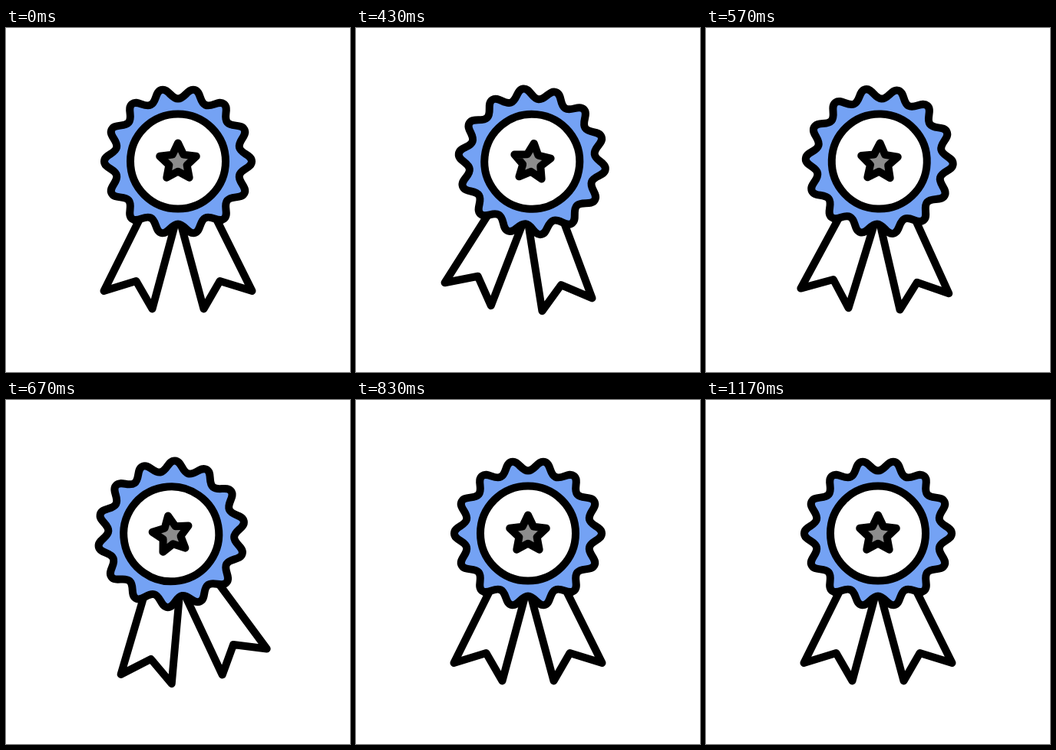
These frames come from a looping animation (448 px wide and 450 px high, 1.21 s). An HTML page:

```html
<!DOCTYPE html>
<html lang="en">
<head>
<meta charset="utf-8">
<title>Award rosette</title>
<style>
  html, body { margin: 0; width: 100%; height: 100%; overflow: hidden; background: #fff; }
  svg { display: block; width: 100%; height: 100%; }
</style>
</head>
<body>
<svg viewBox="0 0 448 450">
  <g id="badge" fill="#fff" stroke="#000" stroke-width="10" stroke-linejoin="round" stroke-linecap="round">
    <path id="ribbon" d="M179 240L127.5 344L169.5 331L190.5 367.5L222 250"/>
    <use href="#ribbon" transform="matrix(-1 0 0 1 448 0)"/>
    <path id="rosette" fill="#74a2f4"/>
    <circle cx="224" cy="174.5" r="62"/>
    <path id="star" fill="#8c8c8c"/>
  </g>
</svg>
<script>
const LOOP = 1210;
const CENTER = { x: 224, y: 174.5 };
const badge = document.getElementById('badge');
const rosette = document.getElementById('rosette');
const star = document.getElementById('star');

// Point at radius r and angle a (clockwise from the top), shifted along the tangent.
function polar(r, a, shift = 0, cy = CENTER.y) {
  const x = CENTER.x + r * Math.sin(a) + shift * Math.cos(a);
  const y = cy - r * Math.cos(a) + shift * Math.sin(a);
  return `${x.toFixed(2)} ${y.toFixed(2)}`;
}

function rosettePath(points, tip, valley) {
  const half = Math.PI / points;
  let d = `M${polar(valley, 0)}`;
  for (let i = 0; i < points; i++) {
    const a = 2 * half * i, b = a + half, c = b + half;
    d += `C${polar(valley, a, 9)} ${polar(tip, b, -9)} ${polar(tip, b)}`;
    d += `C${polar(tip, b, 9)} ${polar(valley, c, -9)} ${polar(valley, c)}`;
  }
  return d + 'Z';
}

function starPath(outer, inner, cy) {
  const corners = Array.from({ length: 10 }, (_, i) =>
    polar(i % 2 ? inner : outer, i * Math.PI / 5, 0, cy));
  return `M${corners.join('L')}Z`;
}

// Linear interpolation through [step, value] keys, constant outside them.
function track(keys, step) {
  if (step <= keys[0][0]) return keys[0][1];
  for (let i = 1; i < keys.length; i++) {
    const [s0, v0] = keys[i - 1], [s1, v1] = keys[i];
    if (step <= s1) return v0 + (v1 - v0) * (step - s0) / (s1 - s0);
  }
  return keys[keys.length - 1][1];
}

const SWING = [[10, 0], [15, 10], [20, -10], [25, 0]];
const PULSE = [[25, 1], [30, 1.35], [35, 1]];

rosette.setAttribute('d', rosettePath(14, 96, 82));
star.setAttribute('d', starPath(25, 12.2, 175.5));

function render(ms) {
  // 30 steps per second, aligned to hundredths of a second.
  const step = Math.floor((Math.floor((ms % LOOP) / 10) + 0.5) * 0.3);
  badge.setAttribute('transform', `rotate(${track(SWING, step)} 224 225)`);
  star.setAttribute('transform',
    `translate(224 174.5) scale(${track(PULSE, step)}) translate(-224 -174.5)`);
}

const start = performance.now();
function tick() {
  render(performance.now() - start);
  requestAnimationFrame(tick);
}
tick();
</script>
</body>
</html>
```
